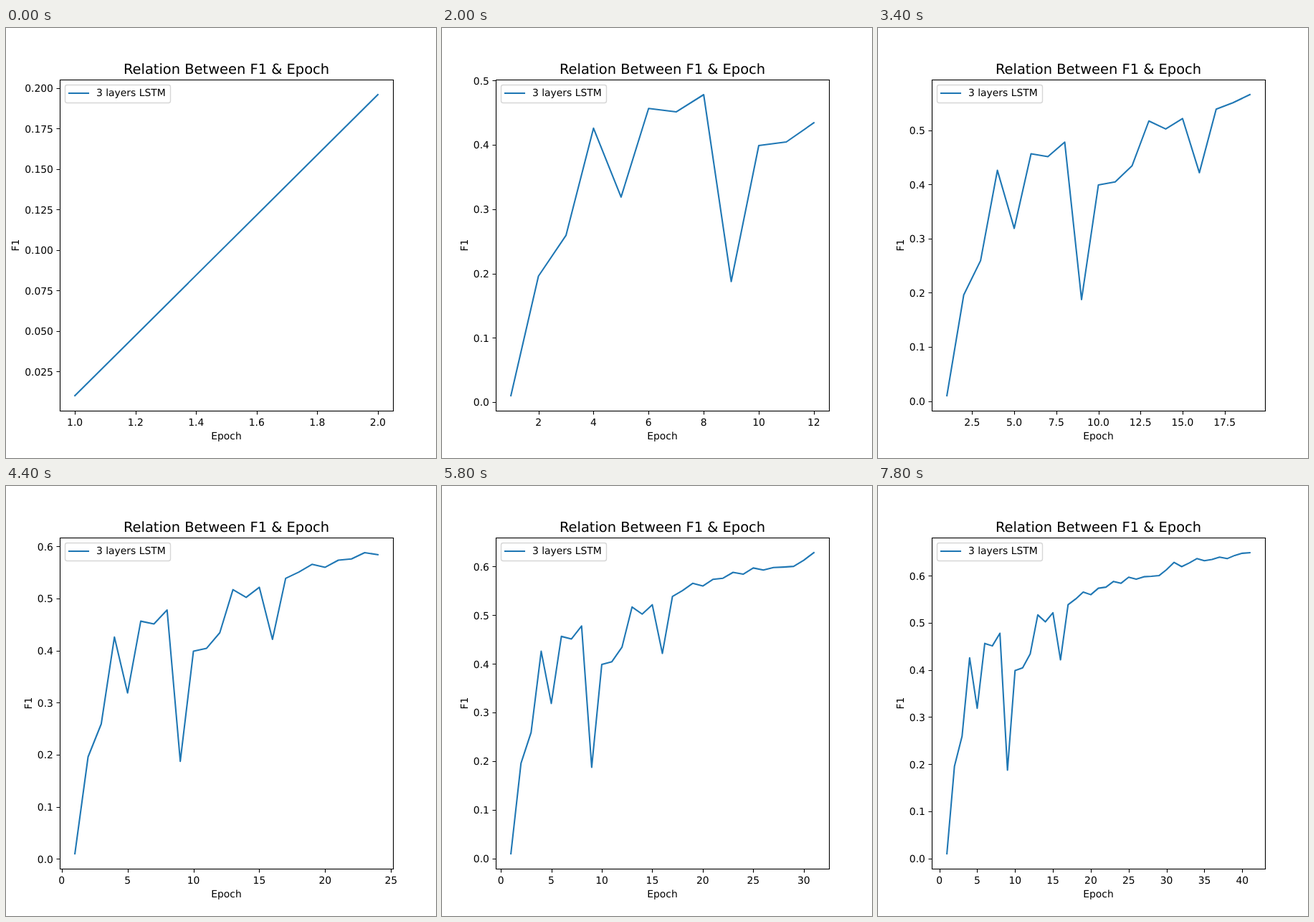
Recreate the animation shown at these times as an HTML page. Size 600 by 600 pixels, loop 8000 ms.

```html
<!DOCTYPE html>
<html lang="en">
<head>
<meta charset="utf-8">
<title>Relation Between F1 &amp; Epoch</title>
<style>
  html, body { margin: 0; width: 100%; height: 100%; overflow: hidden; background: #fff; }
  svg { display: block; width: 600px; height: 600px; }
  text { font: 13.889px "DejaVu Sans", sans-serif; text-rendering: geometricPrecision; }
  .title { font-size: 19.444px; }
  .mid { text-anchor: middle; }
  .end { text-anchor: end; }
  .axis { fill: none; stroke: #000; stroke-width: 1.11; }
  .curve { fill: none; stroke: #1f77b4; stroke-width: 2.083; stroke-linecap: square; stroke-linejoin: round; }
  .box { fill: #fff; fill-opacity: .8; stroke: #ccc; stroke-opacity: .8; stroke-width: 1.39; }
</style>
</head>
<body>
<svg viewBox="0 0 600 600">
  <path id="curve" class="curve"/>
  <path id="ticks" class="axis"/>
  <rect class="axis" x="75.5" y="72.5" width="465" height="462"/>
  <g id="labels"></g>
  <text class="title mid" x="307.5" y="64">Relation Between F1 &amp; Epoch</text>
  <text class="mid" x="307.5" y="574">Epoch</text>
  <text id="ylabel" class="mid">F1</text>
  <rect class="box" x="82.5" y="79.5" width="147" height="25" rx="2.78"/>
  <path class="curve" d="M88 91H115"/>
  <text x="126" y="95">3 layers LSTM</text>
</svg>
<script>
const SCORES = [
  .0101, .1959, .2592, .4259, .3188, .4565, .4512, .478, .1875, .3989,
  .4045, .4343, .517, .5023, .5216, .4216, .5387, .5508, .5656, .56,
  .5737, .576, .5881, .5843, .5971, .5928, .598, .599, .6004, .613,
  .6286, .6195, .6273, .6365, .6321, .6347, .6396, .6365, .6433, .6479, .6492
];
const STEPS = [.025, .05, .1, .2, .25, .5, 1, 2, 2.5, 5];
const MAX_INTERVALS = 9, MARGIN = .05, STEP_MS = 200;
const LEFT = 75, RIGHT = 540, TOP = 72, BOTTOM = 534, DIGIT = 8.84;
const el = id => document.getElementById(id);

// Maps a padded data range onto pixels and picks round tick values.
function makeAxis(min, max, from, to) {
  const pad = (max - min) * MARGIN, lo = min - pad, hi = max + pad;
  const step = STEPS.find(s => s >= (hi - lo) / MAX_INTERVALS);
  const decimals = (String(step).split('.')[1] || '').length;
  const scale = v => from + (v - lo) / (hi - lo) * (to - from);
  const ticks = [];
  for (let i = Math.ceil(lo / step - 1e-9); i <= hi / step + 1e-9; i++) {
    ticks.push({ at: scale(i * step), text: (i * step).toFixed(decimals) });
  }
  return { scale, ticks, decimals };
}

const label = (cls, x, y, text) => `<text class="${cls}" x="${x}" y="${y}">${text}</text>`;

function draw(count) {
  const data = SCORES.slice(0, count);
  const x = makeAxis(1, count, LEFT, RIGHT);
  const y = makeAxis(Math.min(...data), Math.max(...data), BOTTOM, TOP);
  const points = data.map((v, i) => x.scale(i + 1).toFixed(2) + ' ' + y.scale(v).toFixed(2));
  el('curve').setAttribute('d', 'M' + points.join('L'));
  el('ticks').setAttribute('d',
    x.ticks.map(t => `M${Math.round(t.at) + .5} 534.5v5`).join('') +
    y.ticks.map(t => `M75.5 ${Math.round(t.at) + .5}h-5`).join(''));
  el('labels').innerHTML =
    x.ticks.map(t => label('mid', t.at, 555, t.text)).join('') +
    y.ticks.map(t => label('end', 65.9, Math.round(t.at + 5.3), t.text)).join('');
  const labelX = 36 - DIGIT * (y.decimals - 1);
  el('ylabel').setAttribute('transform', `translate(${labelX} 303) rotate(-90)`);
}

const start = performance.now();
let shown = 0;
function tick() {
  const elapsed = performance.now() - start;
  const count = 2 + Math.floor(elapsed / STEP_MS) % (SCORES.length - 1);
  if (count !== shown) draw(shown = count);
  requestAnimationFrame(tick);
}
tick();
</script>
</body>
</html>
```
